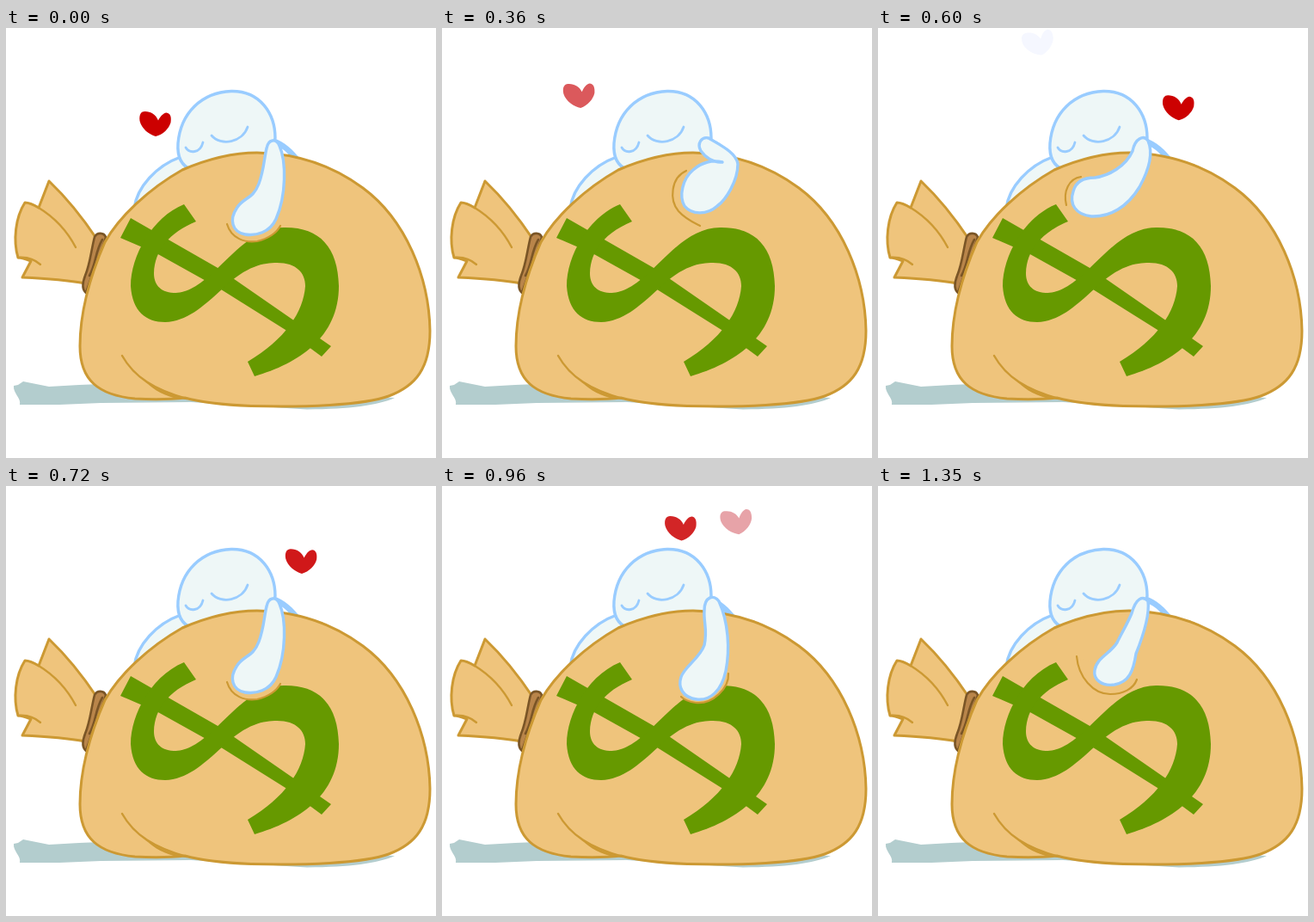
An HTML page for the animation above (1440 ms loop, 500 by 500 pixels).

```html
<!DOCTYPE html>
<html lang="en">
<head>
<meta charset="utf-8">
<title>Money hug</title>
<style>
  html, body { margin: 0; width: 100%; height: 100%; overflow: hidden; background: #fff; }
  svg { display: block; width: 100vw; height: 100vh; }
  path { stroke-linecap: round; stroke-linejoin: round; }
  .bag { fill: #efc47c; stroke: #cc9933; stroke-width: 3; }
  .fold { fill: none; stroke: #cc9933; stroke-width: 2.4; }
  .dent { fill: #efc47c; stroke: #cc9933; stroke-width: 2.2; }
  .skin { fill: #eef7f7; stroke: #99ccff; stroke-width: 3.4; }
  .line { fill: none; stroke: #99ccff; stroke-width: 2.8; }
  .rope { fill: #b9854a; stroke: #7a5526; stroke-width: 2.6; }
  .sign { fill: #669900; }
</style>
</head>
<body>
<svg viewBox="0 0 500 500">
  <path fill="#b3cdce" d="M9 416L14 415L20 411L50 417L85 415L110 414L452 430C432 439 400 443 350 443.500L215 435L110 436L62 438L16 438C18 430 8 425 9 416Z"/>

  <g id="body">
    <path class="skin" d="M149 210C152 185 175 160 203 150L300 150L300 200Z"/>
    <path fill="#99ccff" d="M311 128C323 132 335 142 343 154L333 153C327 144 320 138 311 136Z"/>
    <path class="skin" d="M216 165C203 160 199 148 200 134C203 99 227 75 262 73.500C296 73 313 100 313 128L300 170Z"/>
    <path class="line" d="M209 139C213 146 226 146 229 133M239 125C250 138 275 133 281 115"/>
  </g>

  <g id="neck">
    <path class="bag" d="M14 267C8 247 11 220 22 203C27 203 33 206 38 209L50 178C70 197 90 222 106 246L92 297C70 293 40 291 19 290L29 271C24 269 19 267 14 267Z"/>
    <path class="fold" d="M38 209C56 220 70 234 81 255M14 267C24 266 32 268 40 275"/>
    <path class="rope" d="M103 243C106 237 114 238 116 243C112 260 104 275 93 308C88 304 89 296 92 288C98 274 99 258 103 243Z"/>
    <path class="rope" fill="none" d="M112 246C103 262 105 274 97 288"/>
  </g>

  <g id="sack">
    <path class="bag" d="M86 370C86 330 98 288 115 249C131 220 166 187 205 165C235 152 265 145 292 145C340 146 380 160 415 186C465 223 492 290 493 352C493 395 477 416 445 428C415 439 345 441 285 439.500C250 438 222 434 208 430C190 432 170 432 150 431C108 427 86 410 86 370Z"/>
    <path class="fold" d="M135 381C149 406 173 421 210 431"/>
    <path fill="#cc9933" d="M160 409C175 421 192 427 212 432L195 430C180 426 168 418 160 409Z"/>
  </g>

  <g class="sign">
    <path d="M145 221L248 280L378 370L367 382L325 351L250 304L236 296L175 262L133 244Z"/>
    <path d="M207 205C170 220 145 265 145 300C147 330 163 342 185 342C210 341 228 325 252 303C280 276 300 273 315 273C338 273 348 285 348 300C346 330 325 362 281 388L289 405C340 390 387 360 387 300C386 255 365 232 325 232C290 231 265 262 240 285C220 303 208 308 195 308C178 307 172 297 172 285C173 258 190 238 221 225Z"/>
  </g>

  <path id="crease" class="dent"/>
  <path id="arm" class="skin"/>
  <g id="hearts"></g>
</svg>
<script>
const LOOP = 1440, TICK = 30, HOLD = 90;

// Eight drawings of the rubbing arm: [arm outline, dent in the bag]
const poses = [
  ["M303 140C305 129 314 128 318 137C326 155 326 195 314 222C307 238 290 242 278 240C262 237 260 222 268 210C275 197 287 200 294 181C300 165 300 152 303 140Z",
   "M257 228C262 245 278 250 292 248C305 245 315 238 319 230"],
  ["M304 144C306 128 315 125 320 134C330 158 331 185 323 208C316 225 305 248 284 248C268 248 262 236 266 225C275 208 290 200 298 182C304 165 302 155 304 144Z",
   "M323 225C320 240 305 250 293 250"],
  ["M305 145C305 128 316 126 322 134C333 158 335 190 330 215C325 238 312 250 296 248C280 246 274 234 278 222C282 210 300 200 305 185C309 168 304 158 305 145Z",
   "M333 218C334 235 315 254 295 252C288 251 282 249 278 245"],
  ["M301 142C303 126 314 126 322 135C340 150 353 168 349 190C343 215 322 235 302 233C284 230 282 212 292 200C302 188 316 185 318 175C312 165 300 155 301 142Z",
   "M283 203C276 217 282 238 300 243"],
  ["M326 156C315 157 306 150 301 143C296 134 302 126 310 128C325 137 342 145 344 158C344 178 330 200 320 207C308 218 290 217 282 207C275 195 280 175 292 165C302 156 315 153 326 156",
   "M284 166C266 174 264 200 275 213C283 222 292 226 300 230"],
  ["M301 145C299 130 309 125 315 133C326 145 332 160 322 178C308 200 285 216 262 216C246 215 240 203 246 191C256 174 276 180 292 166C299 160 302 153 301 145Z",
   "M250 172C234 178 230 195 236 211"],
  ["M296 143C299 128 309 124 314 131C320 145 315 165 304 185C290 208 270 220 248 219C230 217 222 205 227 190C230 178 240 174 252 174C268 172 288 161 296 143Z",
   "M236 173C222 175 215 190 219 206"],
  ["M295 148C300 130 308 127 314 134C316 150 308 175 300 195C297 215 292 228 275 231C260 233 250 225 252 214C254 200 270 195 278 182C285 168 290 160 295 148Z",
   "M231 198C233 222 250 242 270 242C285 242 297 236 301 225"]
];

// Each heart floats along p + a*s + b*s*s while s eases in from 0 to 1
const hearts = [
  { start: 0, span: 600, p: [173.5, 111], a: [-68, -90], b: [81, -4] },
  { start: 570, span: 480, p: [349.5, 92.5], a: [-74, -53], b: [96, -37] },
  { start: 810, span: 390, p: [286.5, 55], a: [-75.5, -39.5], b: [100, -30] }
];
const HEART = "M0.500 15C-7 13 -16 6 -18 -3C-19 -11 -16 -14 -12 -14C-5 -14 1 -10 3.500 -3.500C6 -8 9 -12 13 -12.500C18 -12 19 -7 18 -1C16 6 9 13 0.500 15Z";
const RED = [204, 0, 0], PALE = [245, 247, 255];

const arm = document.getElementById("arm");
const crease = document.getElementById("crease");
const layer = document.getElementById("hearts");

for (const h of hearts) {
  h.node = document.createElementNS("http://www.w3.org/2000/svg", "path");
  h.node.setAttribute("d", HEART);
  layer.appendChild(h.node);
}

function drawHeart(h, t) {
  const u = (t - h.start) / h.span;
  const shown = u >= 0 && u <= 1;
  h.node.setAttribute("visibility", shown ? "visible" : "hidden");
  if (!shown) return;
  const s = u * u;
  const [x, y] = h.p.map((p, i) => p + h.a[i] * s + h.b[i] * s * s);
  const color = RED.map((c, i) => Math.round(c + (PALE[i] - c) * s));
  h.node.setAttribute("transform", `translate(${x} ${y}) rotate(${-13 * s})`);
  h.node.setAttribute("fill", `rgb(${color})`);
}

function draw(ms) {
  const t = Math.floor((ms % LOOP) / TICK) * TICK;
  const [limb, dent] = poses[Math.floor(t / HOLD) % poses.length];
  arm.setAttribute("d", limb);
  crease.setAttribute("d", dent);
  hearts.forEach(h => drawHeart(h, t));
}

const begin = performance.now();
function loop() {
  draw(performance.now() - begin);
  requestAnimationFrame(loop);
}
loop();
</script>
</body>
</html>
```
